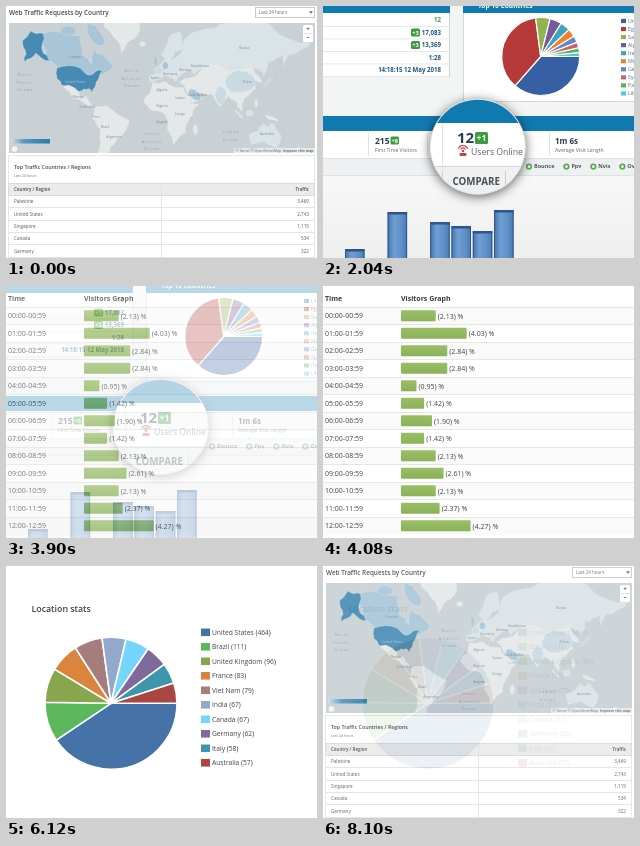
These frames come from a looping animation (311 px wide and 252 px high, 8160 ms). An HTML page with a canvas:

```html
<!DOCTYPE html>
<html lang="en">
<head>
<meta charset="utf-8">
<title>Traffic dashboards</title>
<style>
  html, body { margin: 0; width: 100%; height: 100%; overflow: hidden; background: #fff; }
  canvas { display: block; width: 311px; height: 252px; }
</style>
</head>
<body>
<canvas id="stage"></canvas>
<script>
const W = 311, H = 252, HOLD = 1500, STEP = 60, STEPS = 10;
const SLOT = HOLD + 9 * STEP;
const DPR = window.devicePixelRatio || 1;
const FONT = '"Open Sans", "Noto Sans", sans-serif';
let c;

function sized(canvas) {
  canvas.width = Math.round(W * DPR);
  canvas.height = Math.round(H * DPR);
  return canvas;
}

function scene(draw) {
  const layer = sized(document.createElement('canvas'));
  c = layer.getContext('2d');
  c.scale(DPR, DPR);
  box(0, 0, W, H, '#fff');
  draw();
  return layer;
}

function box(x, y, w, h, fill) {
  c.fillStyle = fill;
  c.fillRect(x, y, w, h);
}

function frame(x, y, w, h, color) {
  c.strokeStyle = color;
  c.lineWidth = 1;
  c.strokeRect(x + .5, y + .5, w - 1, h - 1);
}

function arc(x, y, r, from = 0, to = Math.PI * 2) {
  c.beginPath();
  c.arc(x, y, r, from, to);
}

function disc(x, y, r, fill) {
  c.fillStyle = fill;
  arc(x, y, r);
  c.fill();
}

function rounded(x, y, w, h, r, fill) {
  c.fillStyle = fill;
  c.beginPath();
  c.roundRect(x, y, w, h, r);
  c.fill();
}

function gradient(x0, y0, x1, y1, ...colors) {
  const g = c.createLinearGradient(x0, y0, x1, y1);
  colors.forEach((color, i) => g.addColorStop(i / (colors.length - 1), color));
  return g;
}

// y is the middle of the capitals
function text(str, x, y, size, color = '#444', weight = 400, align = 'left', spacing = 0) {
  c.font = `${weight} ${size}px ${FONT}`;
  c.letterSpacing = spacing + 'px';
  c.textAlign = align;
  c.fillStyle = color;
  c.fillText(str, x, y + size * .36);
}

function pie(cx, cy, r, values, colors, gap) {
  const total = values.reduce((sum, v) => sum + v, 0);
  let a = 0;
  c.strokeStyle = '#fff';
  c.lineWidth = gap;
  c.lineJoin = 'round';
  values.forEach((v, i) => {
    const b = a + v / total * Math.PI * 2;
    c.fillStyle = colors[i];
    c.beginPath();
    c.moveTo(cx, cy);
    c.arc(cx, cy, r, a, b);
    c.closePath();
    c.fill();
    c.stroke();
    a = b;
  });
}

function legend(x, y, step, side, size, labels, colors, ink) {
  labels.forEach((label, i) => {
    const mid = y + step * i;
    box(x, mid - side * .42, side, side * .84, colors[i]);
    text(label, x + side + 2, mid, size, ink);
  });
}

let seed = 7;
function random() {
  seed = seed * 16807 % 2147483647;
  return seed / 2147483647;
}

// Mercator projection
function project([lon, lat]) {
  const a = lat * Math.PI / 180;
  return [151.3 + .81 * lon, 108 - 46.4 * Math.log(Math.tan(Math.PI / 4 + a / 2))];
}

// Splits every edge and pushes the middle sideways for a ragged coast
function ragged(points) {
  return points.flatMap(([x, y], i) => {
    const [nx, ny] = points[(i + 1) % points.length], k = (random() - .5) * .28;
    return [[x, y], [(x + nx) / 2 + (ny - y) * k, (y + ny) / 2 - (nx - x) * k]];
  });
}

function land(fill, points) {
  c.beginPath();
  ragged(ragged(points.map(project))).forEach(p => c.lineTo(...p));
  c.closePath();
  c.fillStyle = fill;
  c.fill();
  c.strokeStyle = 'rgba(240,244,246,.6)';
  c.lineWidth = .35;
  c.stroke();
}

// Key points given as "lon lat, lon lat"
function coast(fill, outline) {
  land(fill, outline.split(',').map(p => p.trim().split(' ').map(Number)));
}

function patch(fill, lon, lat, w, h, tilt = 0) {
  const corner = i => {
    const a = i * Math.PI / 4, dx = w * Math.cos(a), dy = h * Math.sin(a);
    return [lon + dx, lat + dy + dx * tilt];
  };
  land(fill, Array.from({ length: 8 }, (_, i) => corner(i)));
}

function drawLand() {
  const plain = '#e4e8e9', pale = '#dae3e7', mid = '#c9dae3', blue = '#a8c6d8', deep = '#478bb4';
  coast(plain, '-68 77, -53 68, -44 60, -38 65, -22 71, -20 77');
  coast(blue, '-141 70, -95 69, -93 59, -81 52, -78 62, -66 58, -55 51, -66 44, -83 43, -123 49, -137 59');
  patch(blue, -76, 69, 11, 4, -.3);
  patch(blue, -110, 71, 10, 2);
  coast(deep, '-141 70, -156 71, -166 67, -162 59, -164 54, -150 60, -133 55, -141 60');
  coast(deep, '-124 49, -95 49, -83 43, -68 47, -76 36, -80 26, -84 30, -97 27, -106 32, -117 33, -124 40');
  coast(plain, '-117 33, -106 32, -97 26, -95 18, -88 21, -84 15, -78 8, -94 16, -105 20');
  coast(plain, '-78 8, -62 10, -50 0, -35 -7, -41 -22, -58 -38, -66 -50, -74 -48, -70 -18, -81 -5');
  coast(plain, '-17 15, -6 36, 10 37, 32 31, 43 12, 51 11, 40 -5, 35 -22, 20 -35, 9 0, -8 5');
  coast(pale, '-9 37, -9 43, -1 45, -4 48, 8 55, 30 60, 45 50, 30 44, 23 37, 18 41, 9 44, 0 39');
  coast(pale, '5 59, 14 68, 27 71, 30 62, 22 61, 14 55');
  coast(plain, '27 37, 42 41, 60 52, 118 50, 129 36, 118 38, 122 30, 108 20, 104 3, 98 15, 88 22, 78 9, 68 24, 52 26, 56 19, 44 13, 35 29');
  coast(pale, '30 60, 35 68, 70 72, 105 77, 140 73, 190 66, 163 59, 156 51, 157 60, 137 54, 132 43, 118 50, 60 52, 45 44');
  coast(pale, '114 -24, 131 -12, 137 -16, 142 -11, 153 -27, 148 -38, 132 -32, 116 -35');
  patch(mid, 102, 36, 19, 11);
  patch(mid, 78, 22, 7, 11);
  patch(blue, 46, 23, 8, 6, -.4);
  patch(blue, 10, 51, 4, 3);
  patch(mid, 2, 47, 4, 3);
  patch(blue, -2, 54, 2.5, 4);
  patch(plain, -18, 65, 4, 1.3);
  patch(mid, 137, 37, 6, 1.6, .8);
  patch(pale, 114, 1, 4.5, 4);
  patch(pale, 101, 0, 5, 1.8, -1);
  patch(plain, 141, -5, 8, 2.3, -.4);
  patch(plain, 122, 13, 2, 5);
  patch(plain, 47, -19, 2.5, 6);
  patch(plain, 173, -41, 3, 3, .8);
}

function ocean(x, y, name) {
  name.split(' ').forEach((s, i) => text(s, x, y + 7.2 * i, 4, '#98a3a9', 400, 'center', .8));
}

function place(name, x, y, color = '#7c8c95') {
  text(name, x, y, 3.4, color, 400, 'center');
}

function drawMap() {
  c.save();
  c.beginPath();
  c.rect(3, 17, 306, 130);
  c.clip();
  box(3, 17, 306, 130, '#c9d1d4');
  drawLand();
  ocean(19, 69, 'North Pacific Ocean');
  ocean(126, 65, 'North Atlantic Ocean');
  ocean(146, 128, 'South Atlantic Ocean');
  ocean(225, 126, 'Indian Ocean');
  place('Canada', 69, 51);
  place('United States', 69, 76, '#a9c9dc');
  place('Russia', 238, 42);
  place('China', 241, 76);
  place('Saudi Arabia', 191, 89);
  place('Australia', 261, 128);
  ['Mexico', 'Colombia', 'Peru', 'Brazil', 'Argentina'].forEach((s, i) => place(s, 72 + 9 * i, 91 + 10 * i));
  ['Algeria', 'Sudan', 'Nigeria', 'Congo', 'Angola'].forEach((s, i) => place(s, 156 + i % 2 * 18, 84 + 8 * i));
  ['Spain', 'Germany', 'Ukraine', 'Kazakhstan'].forEach((s, i) => place(s, 149 + 15 * i, 72 - 4 * i));
  box(5, 133, 39, 4.5, gradient(5, 0, 44, 0, '#cfe0e9', '#5797bd', '#3f88b2', '#2c7caa'));
  disc(8.5, 143, 2.8, '#f4f6f6');
  box(228, 142, 81, 5, 'rgba(255,255,255,.55)');
  text('© Tarnel © OpenStreetMap', 229.5, 144.7, 3.6, '#666');
  text('Improve this map', 307.5, 144.7, 3.6, '#555', 600, 'right');
  c.restore();
  rounded(297, 19, 10, 17, 1.5, '#fff');
  box(297, 27.3, 10, .5, '#ccc');
  text('+', 302, 23.2, 5.5, '#333', 700, 'center');
  text('−', 302, 31.5, 5.5, '#333', 700, 'center');
}

function countryScene() {
  text('Web Traffic Requests by Country', 3, 7, 6.4, '#4a4a4a', 600);
  frame(249, 1, 60, 11, '#c9c9c9');
  text('Last 24 hours', 253, 6.5, 4.5, '#666');
  c.fillStyle = '#666';
  c.beginPath();
  c.moveTo(303, 5.3);
  c.lineTo(307, 5.3);
  c.lineTo(305, 7.8);
  c.fill();
  drawMap();
  frame(2, 149, 307, 110, '#e6e6e6');
  text('Top Traffic Countries / Regions', 8, 161.5, 5.25, '#4a4a4a', 600);
  text('Last 24 hours', 8, 170, 3.6, '#777');
  box(3, 177, 305, 12, '#ebebeb');
  frame(2, 177, 307, 13, '#dadada');
  text('Country / Region', 8, 183.5, 4.5, '#4a4a4a', 600);
  text('Traffic', 303, 183.5, 4.5, '#4a4a4a', 600, 'right');
  const rows = { Palestine: '3,469', 'United States': '2,743', Singapore: '1,115', Canada: '534', Germany: '322' };
  Object.entries(rows).forEach(([name, count], i) => {
    const y = 195.8 + 12.3 * i;
    text(name, 8, y, 4.6, '#555');
    text(count, 303, y, 4.6, '#555', 400, 'right');
    box(3, Math.round(y + 5.6), 305, 1, '#e4e4e4');
  });
  box(155, 178, 1, 74, '#e2e2e2');
}

const BLUE = '#1079b0', GREEN = '#3d9c3f', NAVY = '#1f5583', SLATE = '#2d3e50';

function badge(str, x, y, w, h) {
  rounded(x, y, w, h, 1.5, GREEN);
  text(str, x + w / 2, y + h / 2, h * .72, '#fff', 700, 'center');
}

function lens() {
  const x = 154.8, y = 140.7, r = 48;
  c.save();
  c.shadowColor = 'rgba(0,0,0,.6)';
  c.shadowBlur = 11 * DPR;
  c.shadowOffsetY = 2 * DPR;
  disc(x, y, r, '#e2e6e8');
  c.restore();
  c.save();
  arc(x, y, r - 1);
  c.clip();
  box(100, 90, 110, 27, BLUE);
  box(100, 117, 110, 43, '#fff');
  box(100, 160, 110, 32, '#eef0f1');
  box(100, 160, 110, 1, '#d2d6d8');
  box(119, 117, 1, 43, '#e1e4e5');
  box(119, 165, 1, 22, '#c9cdd0');
  box(182, 165, 1, 22, '#c9cdd0');
  text('12', 134, 132, 15, SLATE, 700);
  badge('+1', 152, 126, 13, 12);
  c.strokeStyle = '#c9434b';
  c.lineWidth = 1.2;
  for (const k of [2.5, 5]) {
    arc(140, 144.5, k, Math.PI * 1.12, Math.PI * 1.88);
    c.stroke();
  }
  disc(140, 145, 1.3, '#c9434b');
  rounded(136.5, 147, 7, 3, 1, '#c9434b');
  text('Users Online', 148, 146, 8.7, '#5d666d');
  text('COMPARE', 129.5, 175.3, 9.8, '#4a4f54', 700);
  c.restore();
}

function column(height, slot) {
  if (!height) return;
  const x = 22 + 21.3 * slot, y = H - height;
  box(x, y, 19.5, height, gradient(x, 0, x + 19.5, 0, '#4474ae', '#709fd2', '#6391c8', '#4a7bb5'));
  frame(x, y, 19.5, height + 2, '#2c568b');
  box(x, y, 19.5, 2.5, '#2c568b');
}

function visitorPanel() {
  box(0, 0, 127, 71, '#fff');
  box(0, 0, 127, 7, BLUE);
  for (let i = 0; i < 5; i++) box(0, 20 + 12.5 * i, 127, .8, '#dfe3e5');
  box(126, 7, 1, 64, '#cfd4d6');
  ['12', '17,083', '13,369', '1:28', '14:18:15 12 May 2018'].forEach((s, i) => {
    text(s, 118, 14 + 12.5 * i, 6.1, i ? NAVY : GREEN, 700, 'right');
  });
  badge('+3', 88, 22.5, 9, 8);
  badge('+3', 88, 35, 9, 8);
}

function topCountries() {
  box(140, 0, 171, 95, '#fff');
  box(140, 0, 171, 7, BLUE);
  text('Top 10 Countries', 155, 0, 6.6, '#fff', 700);
  box(140, 7, 1, 88, '#d3d8da');
  box(140, 95, 171, 1, '#d3d8da');
  const names = ['United States', 'Egypt', 'Saudi Arabia', 'Algeria', 'Iraq', 'Morocco', 'Germany', 'Syria', 'Palestine', 'Libya'];
  const colors = ['#365fa4', '#b53a39', '#92b44e', '#775a9c', '#3ea4c0', '#ee8232', '#6389c4', '#c56470', '#57b554', '#54c8e6'];
  const shares = names.map((_, i) => i < 2 ? 135 : 22 * .83 ** (i - 2));
  pie(217.7, 50.5, 39, shares, colors, 1.2);
  legend(298, 15, 8.05, 5, 5.3, names, colors, '#4d6f92');
}

function visitorScene() {
  box(0, 0, W, H, '#f3f4f4');
  visitorPanel();
  topCountries();
  box(0, 110, W, 15, BLUE);
  box(0, 125, W, 27, '#fff');
  for (const x of [45, 104, 226]) box(x, 127, 1, 23, '#e1e4e5');
  text('215', 52, 135, 8.5, SLATE, 700);
  badge('+8', 67.5, 130.5, 8.5, 8);
  text('First Time Visitors', 52, 144, 5.1, '#666');
  text('1m 6s', 232, 135, 8, SLATE, 700);
  text('Average Visit Length', 232, 144, 5.2, '#666');
  box(0, 152, W, 18, '#eef0f1');
  for (const y of [152, 169]) box(0, y, W, 1, '#dfe2e3');
  ['Bounce', 'Ppv', 'Nvis', 'Ovis'].reduce((x, name) => {
    c.strokeStyle = '#55a845';
    c.lineWidth = 1.6;
    arc(x, 160.5, 2.3);
    c.stroke();
    text(name, x + 5, 160.5, 5.5, '#4f5659', 700);
    return x + 17 + c.measureText(name).width;
  }, 206);
  box(0, 170, W, 82, gradient(0, 170, 0, H, '#f8f8f8', '#efeff0'));
  [9, 0, 46, 0, 36, 32, 27, 48].forEach(column);
  lens();
}

function hourScene() {
  text('Time', 2, 12.7, 7, '#3d3d3d', 700);
  text('Visitors Graph', 78, 12.7, 7, '#3d3d3d', 700);
  const shares = [2.13, 4.03, 2.84, 2.84, .95, 1.42, 1.9, 1.42, 2.13, 2.61, 2.13, 2.37, 4.27];
  shares.forEach((share, i) => {
    const y = 29.7 + 17.5 * i, w = 16.3 * share, hour = String(i).padStart(2, '0');
    if (i % 2 === 0) box(0, y - 8.7, W, 17.5, '#fafafa');
    box(0, Math.round(y - 9), W, 1, '#e6e6e6');
    text(`${hour}:00-${hour}:59`, 2, y, 7);
    rounded(78, y - 5.5, w, 11, 1, gradient(0, y - 5.5, 0, y + 5.5, '#9abf68', '#8ab256'));
    text(`(${share.toFixed(2)}) %`, 80 + w, y + .3, 7);
  });
}

function locationScene() {
  text('Location stats', 25.5, 43, 8.8, '#444', 600);
  const visits = {
    'United States': 464, Brazil: 111, 'United Kingdom': 96, France: 83, 'Viet Nam': 79,
    India: 67, Canada: 67, Germany: 62, Italy: 58, Australia: 57
  };
  const colors = ['#4572a7', '#5cb85c', '#89a54e', '#db843d', '#a47d7c', '#92a8cd', '#75d6fd', '#80699b', '#3d96ae', '#aa4643'];
  pie(105, 137.3, 66, Object.values(visits), colors, 1.6);
  legend(195, 66.3, 14.5, 9, 6.7, Object.entries(visits).map(([name, n]) => `${name} (${n})`), colors, '#444');
}

const scenes = [countryScene, visitorScene, hourScene, locationScene].map(scene);
const stage = sized(document.getElementById('stage')).getContext('2d');
const start = performance.now();

function play() {
  const t = (performance.now() - start) % (SLOT * scenes.length);
  const i = Math.floor(t / SLOT), past = t % SLOT - HOLD;
  stage.globalAlpha = 1;
  stage.drawImage(scenes[i], 0, 0);
  if (past >= 0) {
    stage.globalAlpha = (Math.floor(past / STEP) + 1) / STEPS;
    stage.drawImage(scenes[(i + 1) % scenes.length], 0, 0);
  }
  requestAnimationFrame(play);
}
play();
</script>
</body>
</html>
```
